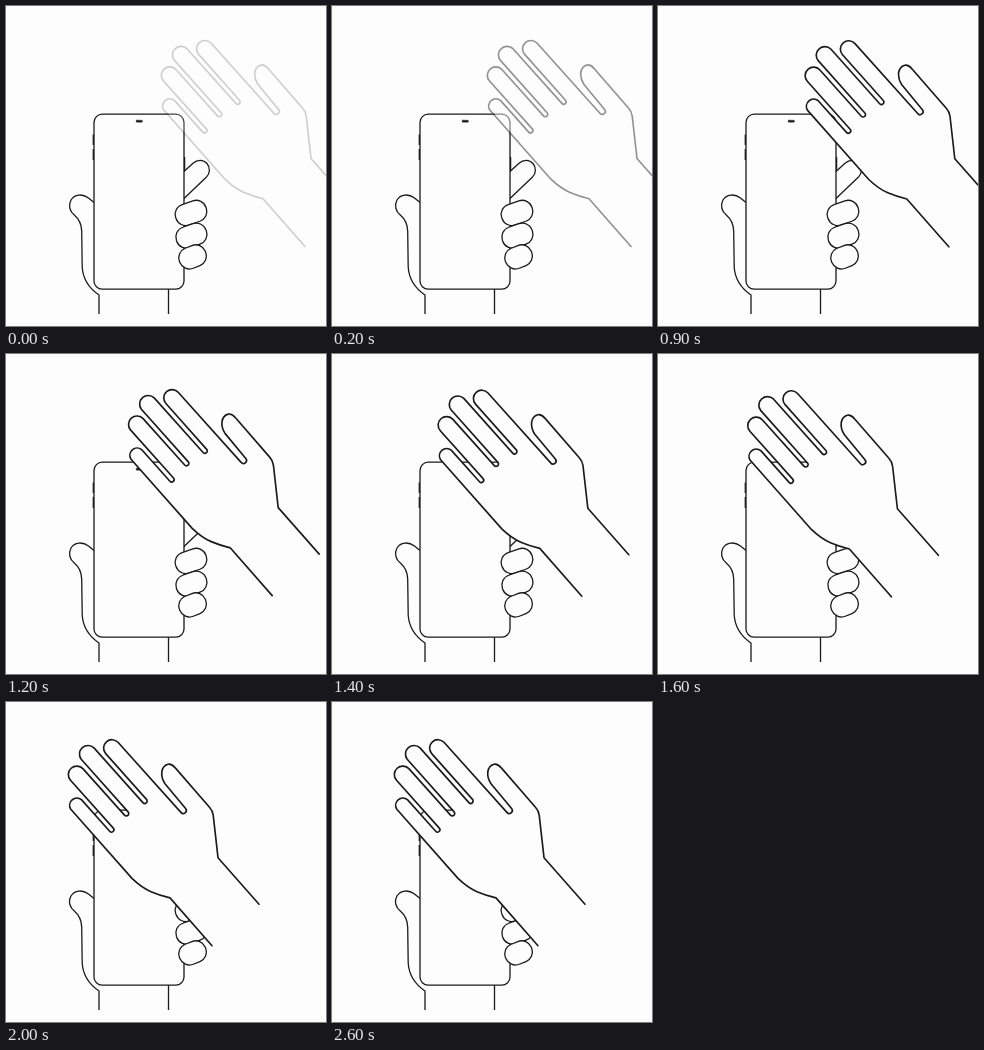
Recreate the animation shown at these times as an HTML page. Size 320 px wide and 320 px high, loop 3100 ms.

```html
<!DOCTYPE html>
<html lang="en">
<head>
<meta charset="utf-8">
<title>Hand over phone</title>
<style>
html, body { margin: 0; width: 100%; height: 100%; overflow: hidden; background: #fefdfe; }
svg { display: block; width: 100%; height: 100%; }
.ink { fill: #fefdfe; stroke: #1a1a1a; stroke-width: 1.3; stroke-linecap: round; stroke-linejoin: round; }
.ink .line { fill: none; }
</style>
</head>
<body>
<svg viewBox="0 0 320 320">
  <g class="ink">
    <!-- holding hand, behind the phone -->
    <path class="line" stroke-linecap="butt" d="M88 196.500 L82.500 192 C76.500 187.500 68.500 188 65 194 C62 199.500 63.800 205.500 68.300 209 C73 213 75.500 218 75.700 225 L76.200 261 C77 274.500 83.500 282.500 93 289 V308 M162.500 283 V308"/>
    <path d="M178 165.500 L187 157.300 C191.500 153.200 197.500 153.500 201 157.500 C204.500 161.500 204 167.500 200.500 171 L178 192.500"/>
    <!-- phone -->
    <path class="line" stroke-width="1.3" stroke-linecap="butt" d="M87.300 128.500 V139 M87.300 143 V154 M178.600 151 V164.500"/>
    <rect x="88" y="108.200" width="90" height="175" rx="8.200"/>
    <rect x="130" y="114.200" width="6.500" height="2" rx="1" fill="#1a1a1a" stroke-width=".4"/>
    <!-- fingers in front of the phone -->
    <rect x="-16" y="-10.800" width="32" height="21.600" rx="10.300" transform="translate(185 206.900) rotate(-19)"/>
    <rect x="-15.700" y="-10.800" width="31.400" height="21.600" rx="10.300" transform="translate(185.400 229.700) rotate(-19)"/>
    <rect x="-13.900" y="-10.800" width="27.800" height="21.600" rx="10.300" transform="translate(186.600 250.900) rotate(-22)"/>
  </g>
  <g id="palm" class="ink">
    <path stroke-width="1.65" d="M299 240.500 L257 192.700 Q247 190.300 238 186.500 C230 183 225.500 179.500 219 173.200
      L157.600 103.800 A7.300 7.300 0 0 1 168.400 94.400
      L196.700 126.100 A2.400 2.400 0 0 0 200.300 122.900
      L157.500 75 A8.400 8.400 0 0 1 170.100 63.700
      L211.500 109.900 A2.400 2.400 0 0 0 215.100 106.700
      L168.200 54.100 A8.600 8.600 0 0 1 181 42.700
      L229.900 97.400 A2.400 2.400 0 0 0 233.500 94.200
      L192.700 48.400 A8.300 8.300 0 0 1 205.200 37.300
      L267.900 107.200 A3 3 0 0 0 272.600 103.400
      L252 78.500 C247 71 247.500 61 255 59 C258 58.300 260.500 60.500 262.300 62.700
      L296.500 102 Q299.700 105.500 300.200 110 L305 152.500 L346 199"/>
  </g>
</svg>
<script>
const LOOP = 3100, STEP = 100;
const palm = document.getElementById('palm');
const clamp = (v, max) => Math.max(0, Math.min(max, v));

function draw(ms) {
  const n = Math.floor((ms % LOOP) / STEP);      // the picture advances ten times a second
  const fade = 0.2 + 0.8 * clamp(n / 6, 1);
  const x = clamp((n - 8) * 8.2, 93);            // steady slide to the left
  palm.setAttribute('opacity', fade.toFixed(3));
  palm.setAttribute('transform', `translate(${-x} ${x / 93 * 3.2})`);
}

const start = performance.now();
function tick() {
  draw(performance.now() - start);
  requestAnimationFrame(tick);
}
tick();
</script>
</body>
</html>
```
